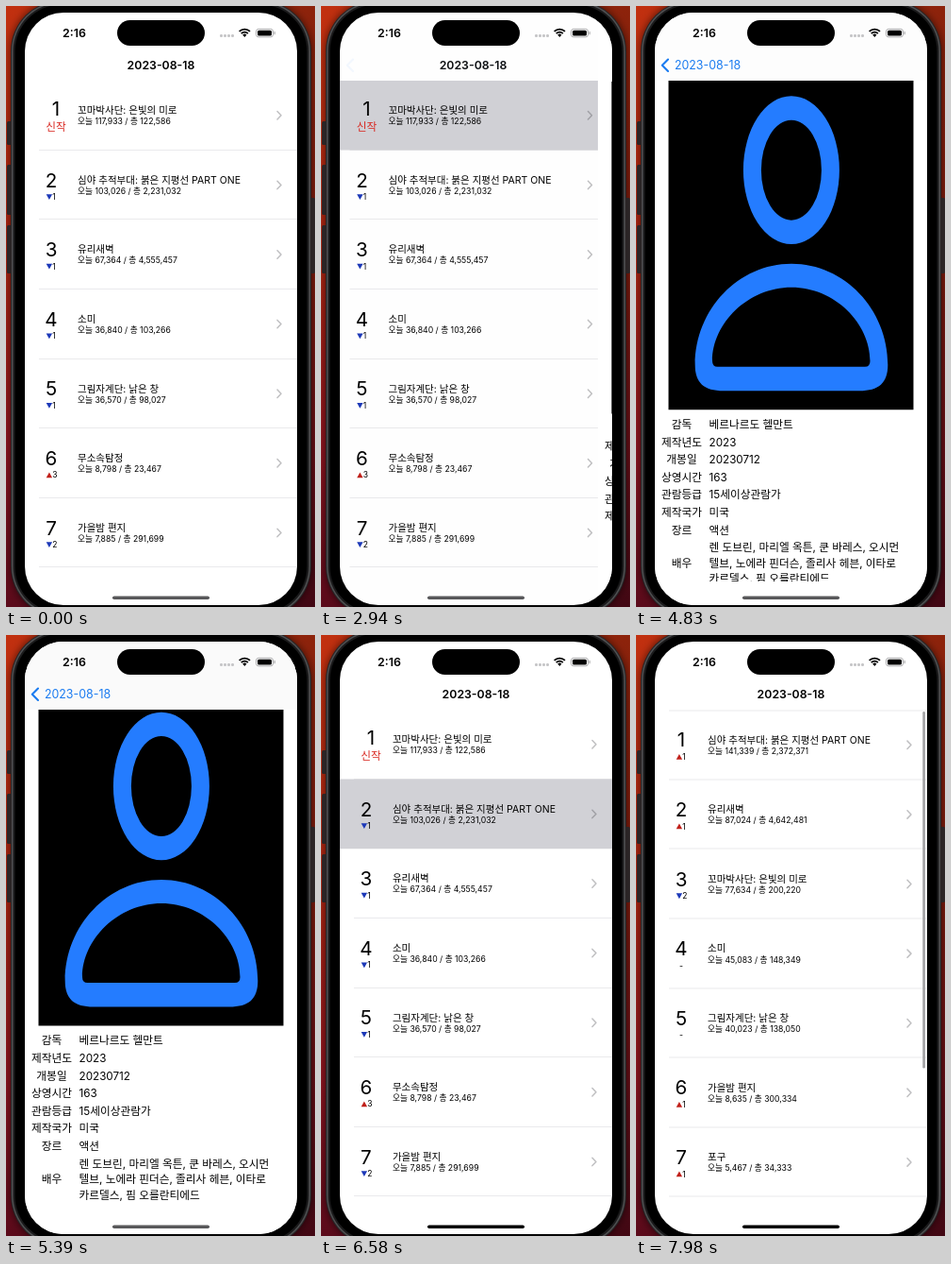
An HTML page with a canvas for the animation above (8000 ms loop, 328 px wide and 636 px high).

```html
<!DOCTYPE html>
<html lang="ko">
<head>
<meta charset="utf-8">
<style>
html, body { margin: 0; width: 100%; height: 100%; overflow: hidden; background: #000; }
canvas { display: block; width: 328px; height: 636px; }
</style>
</head>
<body>
<canvas id="stage" width="328" height="636"></canvas>
<script>
const ctx = document.getElementById('stage').getContext('2d');
const LOOP = 8000, STEP = 70;
const SCREEN = { x: 20, y: 7, w: 289, h: 627 };
const VIEW = { top: 79, bottom: 609 };
const ROW = 73.6;
const BLUE = '#247cff', LINK = '#1a7bf0', RED = '#d92720', HAIRLINE = '#eaeaec';
const DATE = '2023-08-18';

// name, today, total, rank change (null = new entry)
const before = [
  ['꼬마박사단: 은빛의 미로', '117,933', '122,586', null],
  ['심야 추적부대: 붉은 지평선 PART ONE', '103,026', '2,231,032', -1],
  ['유리새벽', '67,364', '4,555,457', -1],
  ['소미', '36,840', '103,266', -1],
  ['그림자계단: 낡은 창', '36,570', '98,027', -1],
  ['무소속탐정', '8,798', '23,467', 3],
  ['가을밤 편지', '7,885', '291,699', -2]
];
const after = [
  [before[1][0], '141,339', '2,372,371', 1],
  [before[2][0], '87,024', '4,642,481', 1],
  [before[0][0], '77,634', '200,220', -2],
  [before[3][0], '45,083', '148,349', 0],
  [before[4][0], '40,023', '138,050', 0],
  [before[6][0], '8,635', '300,334', 1],
  ['포구', '5,467', '34,333', 1]
];
const labels = ['감독', '제작년도', '개봉일', '상영시간', '관람등급', '제작국가', '장르', '배우'];
const details = [
  {
    loadedAt: 840,
    values: ['하세모토 린타로', '2023', '20230720', '109', '12세이상관람가', '일본', '애니메이션', '없음']
  },
  {
    loadedAt: 4830,
    values: ['베르나르도 헬만트', '2023', '20230712', '163', '15세이상관람가', '미국', '액션',
      '렌 도브린, 마리엘 옥튼, 쿤 바레스, 오시먼\n텔브, 노에라 핀더슨, 졸리사 헤븐, 이타로\n카르델스, 핌 오를란티에드']
  }
];

const clamp = v => Math.max(0, Math.min(1, v));
const easeOut = u => 1 - (1 - clamp(u)) ** 2;

// critically damped spring, time in ms
function spring(ms) {
  const x = Math.max(0, ms) * 0.01826;
  return 1 - (1 + x) * Math.exp(-x);
}

function text(str, x, y, size, color = '#000', align = 'left', weight = 400) {
  ctx.font = `${weight} ${size}px Inter, "Noto Sans CJK KR", "Noto Sans CJK", sans-serif`;
  ctx.textAlign = align;
  ctx.fillStyle = color;
  ctx.fillText(str, x, y);
}

function box(x, y, w, h, color, r = 0) {
  ctx.fillStyle = color;
  ctx.beginPath();
  ctx.roundRect(x, y, w, h, r);
  ctx.fill();
}

function line(points, color, width) {
  ctx.strokeStyle = color;
  ctx.lineWidth = width;
  ctx.lineCap = ctx.lineJoin = 'round';
  ctx.beginPath();
  points.forEach(([x, y]) => ctx.lineTo(x, y));
  ctx.stroke();
}

function gradient(x, y, stops) {
  const fill = ctx.createLinearGradient(0, 0, x, y);
  stops.forEach(([at, color]) => fill.addColorStop(at, color));
  return fill;
}

function clipped(x, y, w, h, r, draw) {
  ctx.save();
  ctx.beginPath();
  ctx.roundRect(x, y, w, h, r);
  ctx.clip();
  draw();
  ctx.restore();
}

function drawPhone() {
  box(0, 0, 328, 636, gradient(0, 636,
    [[0, '#c2300f'], [0.45, '#a82312'], [0.74, '#8c1420'], [1, '#5a0a1a']]));
  box(0, 0, 328, 636, gradient(328, 0, [[0, 'rgba(0,0,0,0)'], [1, 'rgba(0,0,0,0.28)']]));
  ctx.save();
  ctx.shadowColor = 'rgba(0,0,0,0.6)';
  ctx.shadowBlur = 8;
  box(5, -6, 319, 653, '#262627', 54);
  ctx.restore();
  [[1, 122, 25], [1, 168, 53], [1, 232, 51], [322, 203, 80]]
    .forEach(([x, y, h]) => box(x, y, 6, h, '#2b2526', 1.5));
  box(6, -5, 317, 651, '#505052', 53);
  box(7.5, -3.5, 314, 648, '#1b1b1c', 51.5);
  box(9.5, -1.5, 310, 644, '#000', 49.5);
}

function drawChange(change, mid) {
  if (change === null) return text('신작', 53, mid + 16.3, 11.7, RED, 'center');
  if (change === 0) return text('-', 48, mid + 15.6, 8.7, '#000', 'center');
  const base = mid + (change > 0 ? 15.4 : 9.8);
  const tip = mid + (change > 0 ? 9.6 : 15.6);
  ctx.fillStyle = change > 0 ? '#c0201a' : '#1c38b8';
  ctx.beginPath();
  ctx.moveTo(42.7, base);
  ctx.lineTo(49.1, base);
  ctx.lineTo(45.9, tip);
  ctx.fill();
  text(Math.abs(change), 49.2, mid + 15.6, 8.5);
}

function drawList(rows, selected, pull) {
  clipped(SCREEN.x - 100, VIEW.top, 500, VIEW.bottom - VIEW.top, 0, () => {
    ctx.translate(0, pull);
    if (pull > 0.1) box(35, VIEW.top, 274, 1, HAIRLINE);
    rows.forEach(([name, today, total, change], i) => {
      const top = VIEW.top + i * ROW, mid = top + ROW / 2;
      box(35, Math.floor(top + ROW - 0.3), 274, 1, HAIRLINE);
      if (i === selected) box(SCREEN.x, top, SCREEN.w, ROW, '#d1d1d6');
      text(i + 1, change === null ? 53 : 48, mid + 2.1 - (change === null ? 1.8 : 0), 20.6, '#000', 'center');
      drawChange(change, mid);
      text(name, 76, mid - 1.7, 10.5);
      text(`오늘 ${today} / 총 ${total}`, 76, mid + 9.4, 8.7);
      line([[288, mid - 4.2], [292, mid], [288, mid + 4.2]], 'rgba(60,60,67,0.32)', 1.5);
    });
  });
}

function drawPerson() {
  box(34.5, 80, 260, 351.5, '#000');
  ctx.fillStyle = BLUE;
  ctx.beginPath();
  ctx.ellipse(164.9, 178, 51, 78.3, 0, 0, 7);
  ctx.closePath();
  ctx.ellipse(164.9, 178, 32, 53, 0, 0, 7);
  ctx.fill('evenodd');
  ctx.fill(new Path2D(
    'M165 277C221 277 267.3 325 267.3 384C267.3 403 258 411.5 237 411.5H93C72 411.5 62.7 403 62.7 384C62.7 325 109 277 165 277Z' +
    'M165 302C211 302 248.5 340 248.5 380Q248.5 386 243 386H86.5Q81 386 81 380C81 340 119 302 165 302Z'), 'evenodd');
}

function drawDetail({ values, loadedAt }, scroll, t) {
  box(SCREEN.x, SCREEN.y, SCREEN.w, SCREEN.h, '#fff');
  clipped(SCREEN.x, VIEW.top, SCREEN.w, VIEW.bottom - VIEW.top, 0, () => {
    ctx.translate(0, -scroll);
    drawPerson();
    if (t < loadedAt) return;
    values.forEach((value, i) => {
      const lines = value.split('\n');
      const y = 451.4 + i * 18.6 + (lines.length - 1) * 8.2;
      text(labels[i], 48.5, y, 11.7, '#000', 'center');
      lines.forEach((s, k) => text(s, 77.5, y + (k - (lines.length - 1) / 2) * 16.5, 11.7));
    });
  });
}

function drawNav(p, pressed) {
  const x = 164.5 - 88.5 * p ** 1.15;
  const dim = pressed ? 0.35 : 1;
  ctx.globalAlpha = 1 - p;
  text(DATE, x, 67, 12.3, '#000', 'center', 600);
  ctx.globalAlpha = p * dim;
  text(DATE, x, 67, 12.4, LINK, 'center');
  line([[34, 56.5], [27.8, 62.7], [34, 68.9]], LINK, 2.1);
  ctx.globalAlpha = 1;
}

function drawStatus(homeColor) {
  text('2:16', 60, 33, 12.4, '#000', 'left', 600);
  box(118, 15, 93, 27, '#000', 13.5);
  for (let i = 0; i < 4; i++) box(227 + i * 4, 30, 3, 3, '#c6c6c8', 1.2);
  ctx.strokeStyle = '#000';
  ctx.lineCap = 'butt';
  ctx.lineWidth = 1.9;
  for (const r of [8, 5]) {
    ctx.beginPath();
    ctx.arc(253.3, 32.6, r, -Math.PI * 0.75, -Math.PI * 0.25);
    ctx.stroke();
  }
  ctx.fillStyle = '#000';
  ctx.beginPath();
  ctx.moveTo(253.3, 33);
  ctx.arc(253.3, 32.6, 3, -Math.PI * 0.75, -Math.PI * 0.25);
  ctx.fill();
  ctx.strokeStyle = '#a5a5a7';
  ctx.lineWidth = 0.9;
  ctx.beginPath();
  ctx.roundRect(265.5, 24.3, 18, 8.6, 2.7);
  ctx.stroke();
  box(267, 25.7, 15, 5.8, '#000', 1.6);
  box(284.6, 27, 1.1, 3.2, '#a5a5a7', 0.5);
  box(113, 624.4, 103, 3.6, homeColor, 1.8);
}

function pushProgress(t) {
  if (t < 2683) return spring(t - 580);
  if (t < 3590) return 1 - spring(t - 2683);
  if (t < 6040) return spring(t - 3590.5);
  return 1 - spring(t - 6040);
}

function detailScroll(t) {
  if (t < 3570) return 0;
  const drag = 10 * easeOut((t - 4760) / 280);
  return drag + 9.2 * Math.sin(Math.PI * clamp((t - 5180) / 630));
}

function listPull(t) {
  return t <= 7560 ? 130 * easeOut((t - 6720) / 840) : 130 * (1 - spring(t - 7560));
}

function selectedRow(t) {
  if (t < 560 || t > 7560) return -1;
  return t < 3570 ? 0 : 1;
}

function render(t) {
  const p = pushProgress(t), pull = listPull(t), scroll = detailScroll(t);
  const detail = details[t < 3570 ? 0 : 1];
  const pressed = (t >= 2590 && t < 2730) || (t >= 5950 && t < 6090);
  drawPhone();
  clipped(SCREEN.x, SCREEN.y, SCREEN.w, SCREEN.h, 41, () => {
    box(SCREEN.x, SCREEN.y, SCREEN.w, SCREEN.h, '#fff');
    if (p < 0.9995) {
      ctx.save();
      ctx.translate(-SCREEN.w * 0.3 * p, 0);
      drawList(t > 7560 ? after : before, selectedRow(t), pull);
      ctx.restore();
      box(SCREEN.x, SCREEN.y, SCREEN.w, SCREEN.h, `rgba(0,0,0,${0.11 * p})`);
    }
    if (p > 0.0008) {
      ctx.save();
      ctx.translate(SCREEN.w * (1 - p), 0);
      drawDetail(detail, scroll, t);
      ctx.restore();
    }
    const material = clamp(scroll / 10) * clamp(p * 10 - 9);
    box(SCREEN.x, SCREEN.y, SCREEN.w, 72, `rgba(250,250,250,${material})`);
    if (t >= 6790) box(304.3, 81, 2.6, 378 - pull, '#a0a0a2', 1.3);
    drawNav(p, pressed);
    drawStatus(t >= 6500 ? '#000' : '#58585a');
  });
}

function tick() {
  const t = performance.now() % LOOP;
  render(Math.floor(t / STEP) * STEP);
  requestAnimationFrame(tick);
}
tick();
</script>
</body>
</html>
```
